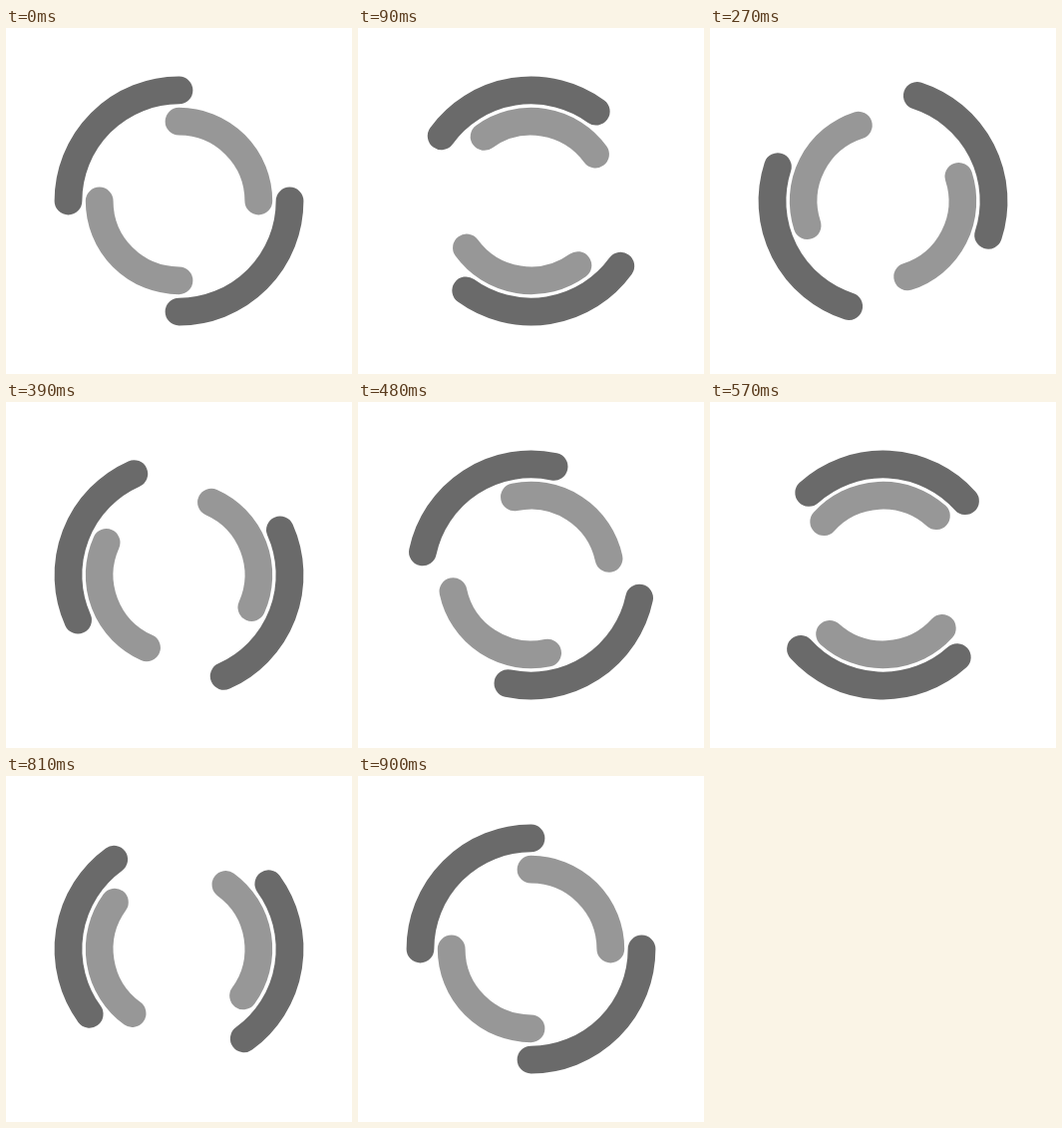
Recreate the animation shown at these times as an HTML page. Size 347 by 347 pixels, loop 0.93 s.

```html
<!DOCTYPE html>
<html lang="en">
<head>
<meta charset="utf-8">
<title>Double ring spinner</title>
<style>
  html, body { margin: 0; width: 100%; height: 100%; overflow: hidden; background: #fff; }
  svg { display: block; width: 100%; height: 100%; }
  path { fill: none; stroke-width: 8; stroke-linecap: round; }
</style>
</head>
<body>
<svg viewBox="-50 -50 100 100">
  <path id="outer" stroke="#6a6a6a" d="M-32 0A32 32 0 0 1 0-32M32 0A32 32 0 0 1 0 32"/>
  <path id="inner" stroke="#979797" d="M0-23A23 23 0 0 1 23 0M0 23A23 23 0 0 1-23 0"/>
</svg>
<script>
  const STEP = 30, LOOP = 930, DEGREES_PER_STEP = 12;
  const outer = document.getElementById('outer');
  const inner = document.getElementById('inner');

  // The rings turn in opposite directions; the closing step repeats the opening pose.
  function draw() {
    const angle = Math.floor(performance.now() % LOOP / STEP) * DEGREES_PER_STEP;
    outer.setAttribute('transform', `rotate(${angle})`);
    inner.setAttribute('transform', `rotate(${-angle})`);
    requestAnimationFrame(draw);
  }
  draw();
</script>
</body>
</html>
```
